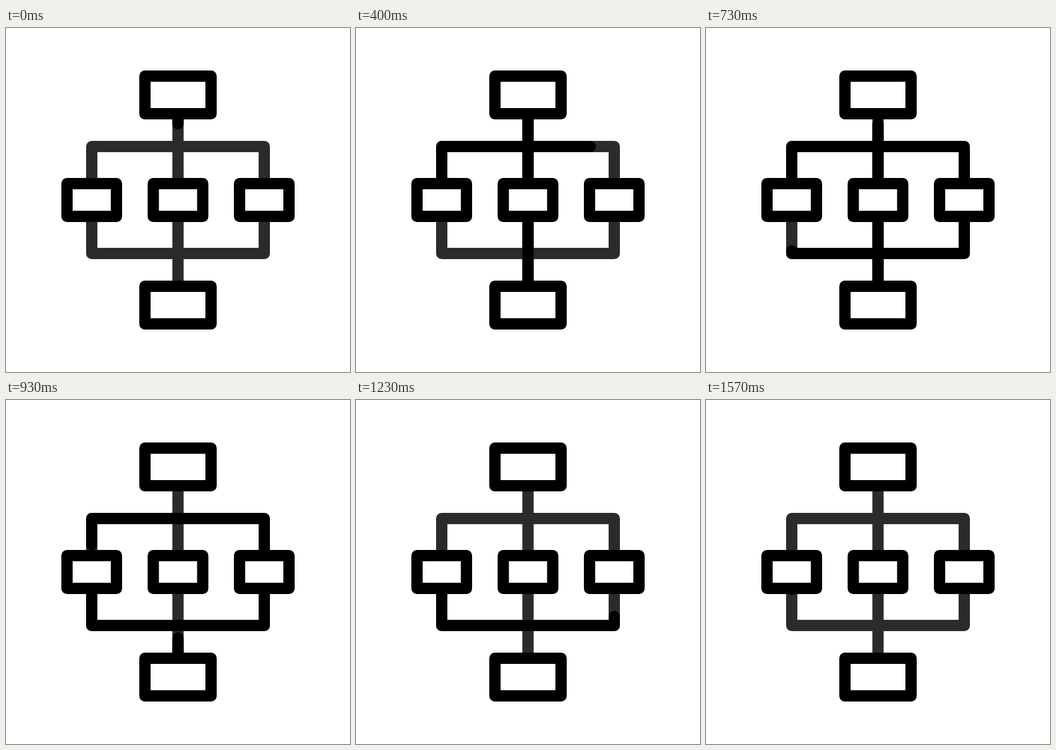
Write an HTML page that moves like this. It is 640x640 px and loops after 1670 ms.

```html
<!DOCTYPE html>
<html lang="en">
<head>
<meta charset="utf-8">
<title>Flow chart</title>
<style>
  html, body { margin: 0; width: 100%; height: 100%; overflow: hidden; background: #fff; }
  svg { display: block; width: 100vw; height: 100vh; }
  path, rect { fill: none; stroke: #000; stroke-width: 21; stroke-linecap: round; stroke-linejoin: round; }
  rect { fill: #fff; }
  .base use { stroke: #2b2b2b; }
  .base path { stroke: #2b2b2b; }
</style>
</head>
<body>
<svg viewBox="0 0 640 640">
  <g class="base">
    <path d="M320 159.5V480.5"/>
    <path d="M159.5 320V220.5H480.5V419.5H159.5Z"/>
  </g>
  <path id="stem" d="M320 159.5V480.5"/>
  <path id="ring" d="M159.5 320V220.5H480.5V419.5H159.5V320"/>
  <rect x="258.5" y="89.5" width="123" height="70"/>
  <rect x="258.5" y="480.5" width="123" height="70"/>
  <rect x="113.5" y="289.5" width="92" height="61"/>
  <rect x="274" y="289.5" width="92" height="61"/>
  <rect x="434.5" y="289.5" width="92" height="61"/>
</svg>
<script>
const LOOP = 1670;
const LAG = 22; // frames between drawing and erasing

// Bezier easing with control points (a, 0) and (b, 1)
function ease(x, a, b) {
  if (x <= 0) return 0;
  if (x >= 1) return 1;
  let lo = 0, hi = 1;
  for (let i = 0; i < 24; i++) {
    const q = (lo + hi) / 2, r = 1 - q;
    if (3 * r * r * q * a + 3 * r * q * q * b + q * q * q < x) lo = q;
    else hi = q;
  }
  return lo * lo * (3 - 2 * lo);
}

function tracer(id, start, span, a, b) {
  const el = document.getElementById(id);
  const total = el.getTotalLength();
  const at = f => total * ease((f - start) / span, a, b);
  return f => {
    const head = at(f), tail = at(f - LAG);
    el.style.strokeDasharray = `${head - tail} ${2 * total}`;
    el.style.strokeDashoffset = -tail;
  };
}

const tracers = [
  tracer("stem", -1.38, 9.4, 1 / 3, 2 / 3),
  tracer("ring", 2, 27.7, 0.41, 0.4)
];

// 30 fps, held for 30, 40 and 30 ms in turn
function frameAt(ms) {
  const rest = ms % 100;
  return Math.floor(ms / 100) * 3 + (rest >= 30) + (rest >= 70);
}

const t0 = performance.now();
function tick() {
  const f = Math.min(49, frameAt((performance.now() - t0) % LOOP));
  tracers.forEach(draw => draw(f));
  requestAnimationFrame(tick);
}
tick();
</script>
</body>
</html>
```
